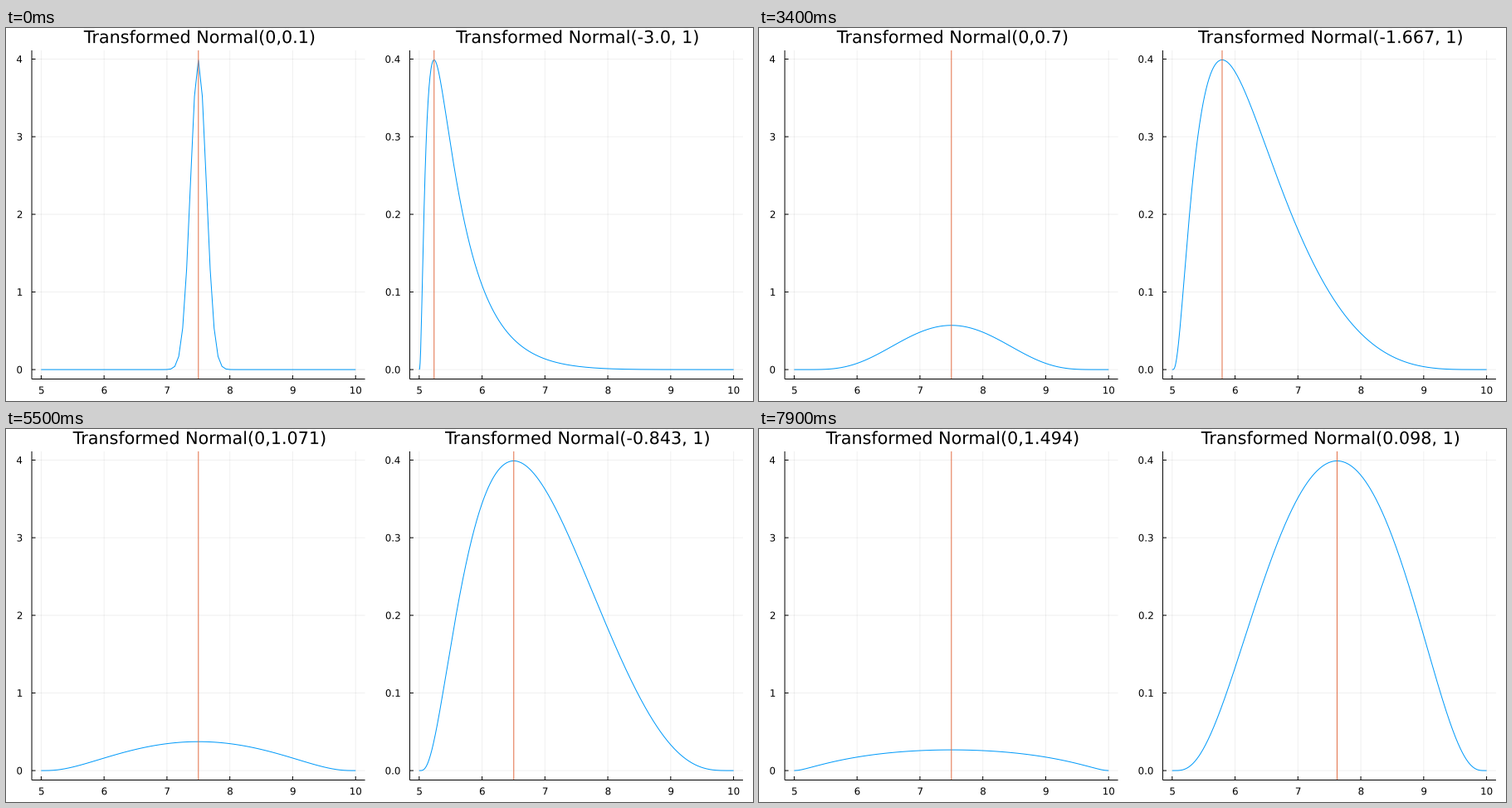
Animation of 900 by 450 pixels, one loop 8000 ms. Source, as a matplotlib script:

```python
import numpy as np
import matplotlib.pyplot as plt
from matplotlib.animation import FuncAnimation
from matplotlib.patches import PathPatch
from matplotlib.textpath import TextPath
from matplotlib.transforms import Affine2D

W, H, DPI = 900, 450, 100
FRAMES, INTERVAL = 80, 100
BLUE, ORANGE = "#009AFA", "#E36F47"
FONT = {"family": "DejaVu Sans"}
TITLE_SIZE, TICK_SIZE = 20.7, 11.85
LO, HI = 5, 10
X_UNIT, Y_STEP = 75.76, 93.65    # pixels per x unit and per y tick
BASE, TOP, BOTTOM = 412.1, 27, 423.5

fig = plt.figure(figsize=(W / DPI, H / DPI), dpi=DPI, facecolor="white")
ax = fig.add_axes([0, 0, 1, 1])
ax.set(xlim=(0, W), ylim=(H, 0))
ax.axis("off")


def line(xs, ys, color="black", **kw):
    """One pixel wide line at its exact, unrounded place."""
    return ax.plot(xs, ys, color=color, lw=72 / DPI, snap=False,
                   solid_capstyle="butt", **kw)[0]


def outline(x, y, text, size, align=0.5):
    """Text outline on baseline y; align 0.5 centres it, 1 ends it at x."""
    path = TextPath((0, 0), text, size=size, prop=FONT)
    box = path.get_extents()
    dx = x - box.x0 - align * box.width
    return path.transformed(Affine2D().scale(1, -1).translate(dx, y))


def label(path):
    return ax.add_patch(PathPatch(path, facecolor="black", lw=0, snap=False,
                                  zorder=5))


def density(x, mu, sigma):
    """Normal density at the logit of x rescaled from (LO, HI)."""
    p = np.clip((x - LO) / (HI - LO), 1e-12, 1 - 1e-12)
    z = (np.log(p / (1 - p)) - mu) / sigma
    return np.exp(-z * z / 2) / (sigma * np.sqrt(2 * np.pi))


def center(mu):
    return LO + (HI - LO) / (1 + np.exp(-mu))


class Panel:
    def __init__(self, x_lo, y_tick, y_fmt, points):
        self.x_lo, self.y_tick = x_lo, y_tick
        self.x = np.linspace(LO, HI, points)
        left, right = self.to_x(LO - 0.15), self.to_x(HI + 0.15)
        self.mid = (left + right) / 2 + 0.7

        for v in range(LO, HI + 1):
            x = self.to_x(v)
            line([x, x], [TOP, BOTTOM], alpha=0.06, zorder=1)
            line([x, x], [BOTTOM, BOTTOM - 4.5], zorder=4)
            label(outline(x + 0.3, 441.2, str(v), TICK_SIZE))
        for k in range(5):
            y = BASE - k * Y_STEP
            line([left, right], [y, y], alpha=0.06, zorder=1)
            line([left, left + 4.5], [y, y], zorder=4)
            label(outline(left - 11.8, y + 4.4, y_fmt.format(k * y_tick),
                          TICK_SIZE, align=1))
        line([left, right], [BOTTOM, BOTTOM], zorder=4)
        line([left, left], [TOP, BOTTOM], zorder=4)

        self.curve = line([], [], BLUE, zorder=2, solid_joinstyle="miter")
        self.mark = line([], [], ORANGE, zorder=3)
        self.title = label(outline(self.mid, 18.1, "Normal", TITLE_SIZE))

    def to_x(self, v):
        return self.x_lo + (v - LO) * X_UNIT

    def show(self, mu, sigma, args):
        y = BASE - density(self.x, mu, sigma) / self.y_tick * Y_STEP
        self.curve.set_data(self.to_x(self.x), y)
        m = self.to_x(center(mu))
        self.mark.set_data([m, m], [TOP, BOTTOM])
        text = f"Transformed Normal({args})"
        self.title.set_path(outline(self.mid, 18.1, text, TITLE_SIZE))


spread = Panel(42.4, 1, "{:.0f}", 81)
shift = Panel(497.8, 0.1, "{:.1f}", 641)


def draw(i):
    sigma = 0.1 + i * 0.9 / 51
    mu = -3 + i * 2 / 51
    spread.show(0, sigma, f"0,{round(sigma, 3)}")
    shift.show(mu, 1, f"{round(mu, 3)}, 1")
    return []


anim = FuncAnimation(fig, draw, frames=FRAMES, interval=INTERVAL,
                     init_func=lambda: draw(0), repeat=True, repeat_delay=0)
plt.show()
```
